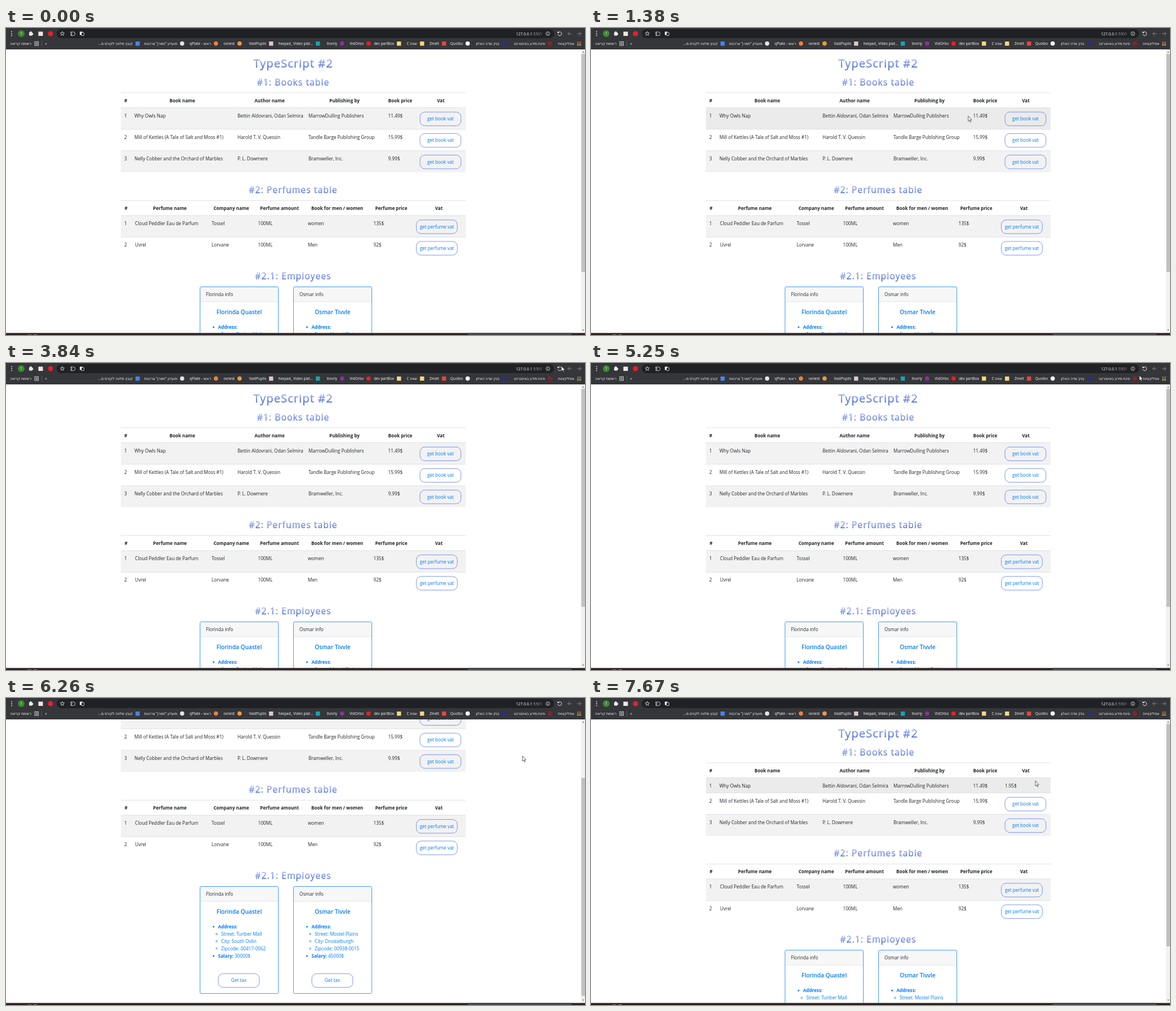
These frames come from a looping animation (1028 px wide and 545 px high, 8000 ms). An HTML page:

```html
<!DOCTYPE html>
<html lang="en">
<head>
<meta charset="utf-8">
<title>TypeScript tables</title>
<style>
  html, body { margin: 0; width: 100%; height: 100%; overflow: hidden; background: #fff; }
  svg { display: block; width: 100%; height: 100%; }
  text { font: 8.2px "Open Sans", "Noto Sans", "DejaVu Sans", sans-serif; fill: #212529; white-space: pre; }
  .mid { text-anchor: middle; }
  .end { text-anchor: end; }
  .rtl { direction: rtl; }
  .bold { font-weight: 700; font-size: 8.1px; }
  .blue { fill: #007bff; }
  .white { fill: #fff; }
  .name { font-weight: 600; font-size: 10.1px; }
  .h1, .h2 { fill: url(#heading); stroke: url(#heading); stroke-width: .3; }
  .h1 { font-size: 20.3px; letter-spacing: 1px; }
  .h2 { font-size: 15.7px; letter-spacing: 1.05px; }
  .bookmark { font-size: 6.4px; fill: #fff; }
  .url { font-size: 6.9px; fill: #fff; }
  .port { fill: #9aa0a6; }
  .line { fill: none; stroke: #e8eaed; stroke-width: 1; }
</style>
</head>
<body>
<svg viewBox="0 0 1028 545">
  <defs>
    <linearGradient id="heading" x2="0" y2="1">
      <stop offset=".2" stop-color="#aab4f5"/>
      <stop offset=".8" stop-color="#4a6de0"/>
    </linearGradient>
    <clipPath id="viewport"><rect y="38" width="1028" height="503"/></clipPath>
  </defs>
  <g id="stage"></g>
</svg>
<script>
const LOOP = 8000, CLICK = 7360;
const stage = document.getElementById('stage');

// start, ms per step, steps, end x, end y, optional control point
const moves = [
  [70, 60, 1, 1013, 517], [130, 60, 1, 1007, 396],
  [280, 80, 5, 831, 268], [830, 80, 6, 651, 159.5],
  [1380, 78, 6, 904, 117], [2100, 79, 11, 850, 236, 700, 160],
  [2960, 79, 11, 985.5, 5.5, 900, 190], [3840, 79, 10, 984, 7, 996, 4],
  [5250, 80, 4, 917, 103], [6650, 77, 5, 791, 139],
  [7040, 80, 1, 790, 156], [7590, 80, 2, 789, 147],
];

// time, scroll offset held from then on
const scrolls = [[0, 0], [5570, 20], [5650, 68], [5720, 129], [6260, 125], [6340, 75], [6420, 22], [6510, 0]];

const books = {
  top: 115, label: 'get book vat', buttonX: 735,
  heads: ['#', 'Book name', 'Author name', 'Publishing by', 'Book price', 'Vat'],
  centers: [212.5, 313, 468, 601, 700, 772],
  columns: [210, 228, 411, 537, 678.5],
  rows: [
    ['1', 'Why Owls Nap', 'Bettin Aldovrani, Odan Selmira', 'MarrowDulling Publishers', '11.49$'],
    ['2', 'Mill of Kettles (A Tale of Salt and Moss #1)', 'Harold T. V. Quessin', 'Tandle Barge Publishing Group', '15.99$'],
    ['3', 'Nelly Cobber and the Orchard of Marbles', 'P. L. Dowmere', 'Bramweller, Inc.', '9.99$'],
  ],
};
const perfumes = {
  top: 306.5, label: 'get perfume vat', buttonX: 728.5,
  heads: ['#', 'Perfume name', 'Company name', 'Perfume amount', 'Book for men / women', 'Perfume price', 'Vat'],
  centers: [213, 291, 400, 485.5, 588, 684, 768.5],
  columns: [210, 229, 365, 447.5, 536, 652.5],
  rows: [
    ['1', 'Cloud Peddler Eau de Parfum', 'Tossel', '100ML', 'women', '135$'],
    ['2', 'Uvrel', 'Lorvane', '100ML', 'Men', '92$'],
  ],
};
const employees = [
  { x: 344, name: 'Florinda Quastel', street: 'Tunber Mall', city: 'South Ovlin', zip: '00417-0062', salary: '30000$' },
  { x: 510, name: 'Osmar Tivvle', street: 'Mostel Plains', city: 'Drostelburgh', zip: '00938-0015', salary: '45000$' },
];

// label, right edge, icon colour, round icon
const bookmarks = [
  ['קובץ מלווה לקורס מ...', 225, '#4285f4'], ['מועדון "תמרן" צרכנות', 304, '#dfe5ea', 1],
  ['qPlate - ראשי', 364, '#f0803c', 1], ['ovnest', 406, '#ee9a3a', 1], ['VastPupils', 462, '#d9c9c9'],
  ['hexpad_ Video plat...', 545, '#12a5b5'], ['tivorly', 588, '#8c2f9e', 1], ['VidOrbo', 635, '#f21d1d', 1],
  ['dev partBox', 689, '#f6d978'], ['שפת C', 730, '#f6d978'], ['Zmelt', 769, '#e5473a'],
  ['Quolbo', 811, '#ffffff', 1], ['בנק שדה האלון', 876, '#2b2f7c'], ['פינת מידע באינטרנט', 957, '#8e1f2b', 1],
];

const rect = (x, y, w, h, fill, extra = '') => `<rect x="${x}" y="${y}" width="${w}" height="${h}" fill="${fill}" ${extra}/>`;
const circle = (x, y, r, fill, extra = '') => `<circle cx="${x}" cy="${y}" r="${r}" fill="${fill}" ${extra}/>`;
const path = (d, extra = 'class="line"') => `<path d="${d}" ${extra}/>`;
const text = (x, y, content, style = '') => `<text x="${x}" y="${y}" class="${style}">${content}</text>`;
const inside = (p, x, y, w, h) => p.x >= x && p.x < x + w && p.y >= y && p.y < y + h;
const range = n => [...Array(n).keys()];

function cursorAt(t) {
  let x = 1013, y = 517;
  for (const [start, step, count, endX, endY, cx = (x + endX) / 2, cy = (y + endY) / 2] of moves) {
    if (t < start) break;
    const p = Math.min(1, (Math.floor((t - start) / step) + 1) / count);
    const s = p * p * (3 - 2 * p);
    const bend = (a, c, b) => (1 - s) ** 2 * a + 2 * s * (1 - s) * c + s * s * b;
    [x, y] = [bend(x, cx, endX), bend(y, cy, endY)];
  }
  return { x, y };
}

const scrollAt = t => scrolls.filter(([start]) => start <= t).pop()[1];

function button(x, y, label, mouse) {
  const hover = inside(mouse, x, y, 73, 24.3);
  return rect(x, y, 72.8, 24.3, hover ? '#007bff' : 'none', 'rx="8.5" stroke="#5f7cf0" stroke-width=".8"')
    + text(x + 36.5, y + 15, label, hover ? 'mid white' : 'mid blue');
}

function table({ top, label, buttonX, heads, centers, columns, rows }, mouse, firstVat) {
  let y = top + 26.5;
  let out = rect(204, top - .5, 612, 1, '#dee2e6')
    + heads.map((head, i) => text(centers[i], top + 16.6, head, 'mid bold')).join('');
  rows.forEach((cells, i) => {
    const solved = firstVat && i === 0;
    const height = solved ? 27 : 38.2;
    if (i % 2 === 0) out += rect(204, y, 612, height, '#f2f2f2');
    if (inside(mouse, 204, y, 612, height)) out += rect(204, y, 612, height, '#ebebeb');
    out += rect(204, y - .5, 612, 1, '#dee2e6');
    out += cells.map((cell, c) => text(columns[c], y + 17.2, cell)).join('');
    out += solved ? text(buttonX, y + 17.2, firstVat) : button(buttonX, y + 7.7, label, mouse);
    y += height;
  });
  return out;
}

function card({ x, name, street, city, zip, salary }, mouse) {
  const details = [`Street: ${street}`, `City: ${city}`, `Zipcode: ${zip}`];
  return rect(x + .5, 459.5, 139, 26.5, '#f7f7f7', 'rx="2"') + rect(x, 485.5, 139, .8, '#dfdfdf')
    + rect(x + .5, 459.5, 139, 190, 'none', 'rx="2" stroke="#2b90ff" stroke-width=".9"')
    + text(x + 11, 475.8, `${name.split(' ')[0]} info`)
    + text(x + 70, 507.5, name, 'mid name blue')
    + circle(x + 24.5, 531, 1.5, '#007bff') + text(x + 32.5, 534, 'Address:', 'bold blue')
    + details.map((line, i) => circle(x + 30, 544 + i * 12.9, 1.4, 'none', 'stroke="#007bff" stroke-width=".7"')
      + text(x + 38, 547 + i * 12.9, line, 'blue')).join('')
    + circle(x + 24.5, 583, 1.5, '#007bff')
    + text(x + 32.5, 586, `<tspan class="bold">Salary:</tspan> ${salary}`, 'blue')
    + button(x + 33, 614.4, 'Get tax', mouse);
}

function page(t, cursor) {
  const scroll = scrollAt(t), clicked = t >= CLICK, shift = clicked ? -11.8 : 0;
  const mouse = t < 70 || cursor.y < 38 ? { x: -1, y: -1 } : { x: cursor.x, y: cursor.y + scroll };
  const lower = { x: mouse.x, y: mouse.y - shift };
  return `<g clip-path="url(#viewport)"><g transform="translate(0 ${-scroll})">`
    + text(510, 70.2, 'TypeScript #2', 'mid h1')
    + text(510, 102.4, '#1: Books table', 'mid h2')
    + table(books, mouse, clicked && '1.95$')
    + `<g transform="translate(0 ${shift})">`
    + text(510, 293, '#2: Perfumes table', 'mid h2')
    + table(perfumes, lower)
    + text(510, 446.2, '#2.1: Employees', 'mid h2')
    + employees.map(person => card(person, lower)).join('')
    + '</g></g></g>'
    + rect(1021, 38, 7, 503, '#f1f1f1')
    + rect(1021.5, 46 + scroll * .767, 6.5, clicked ? 395 : 387, '#c1c1c1')
    + path('M1023 43.5l1.8-2 1.8 2zM1023 535.5l1.8 2 1.8-2z', 'fill="#606060"');
}

function toolbar(loading) {
  const dots = [6.5, 10, 13.5].map(y => circle(10, y, .9, '#e8eaed')).join('');
  const puzzle = rect(41, 7.5, 6, 6, '#e8eaed', 'rx=".8"') + circle(44, 7.2, 1.5, '#e8eaed') + circle(47, 10.5, 1.5, '#e8eaed');
  const star = range(10).map(i => {
    const r = i % 2 ? 1.7 : 3.9, a = i * Math.PI / 5;
    return `${100 + r * Math.sin(a)} ${10 - r * Math.cos(a)}`;
  }).join('L');
  const reload = loading
    ? path('M980 7l6 6m0-6l-6 6')
    : path('M980.3 8.2A3.4 3.4 0 1 1 979.8 11') + path('M979.2 5.7v3.4h3.4z', 'fill="#e8eaed"');
  const translate = rect(131, 6.5, 5, 6, '#e8eaed', 'rx=".7"')
    + rect(134, 8, 4.5, 5.5, '#202124', 'rx=".7" stroke="#e8eaed" stroke-width=".8"');
  return rect(0, 0, 1028, 38, '#35363a') + rect(90, 2, 883, 16, '#202124', 'rx="8"')
    + dots + circle(27, 10, 6, '#3b8a2e') + text(27, 12.3, '1', 'mid url')
    + puzzle + rect(57.5, 6.5, 8, 7.5, '#f0e8e8') + circle(79, 10, 4.6, '#e4202c')
    + path(`M${star}Z`, 'class="line" style="stroke-width:.8"')
    + path('M115 7h4.5a1.5 1.5 0 0 1 0 6.5h-4zM115 7l2.5 3-2.5 3.5', 'class="line" style="stroke-width:.8"')
    + (loading ? '' : translate)
    + text(952, 12.5, '127.0.0.1<tspan class="port">:5501</tspan>', 'end url')
    + circle(962, 10, 3.3, 'none', 'stroke="#e8eaed" stroke-width=".8"') + path('M962 9.6v2.2M962 8v.8')
    + reload
    + path('M1004.5 10h-7m3.2-3.3l-3.3 3.3 3.3 3.3M1014 10h7m-3.2-3.3l3.3 3.3-3.3 3.3', 'class="line" style="stroke:#85878a"');
}

function bookmarkBar() {
  const entry = (label, right) => text(right, 30, label, `bookmark ${/^[א-ת]/.test(label) ? 'rtl' : 'end'}`);
  const colours = ['#e05545', '#4caf67', '#e8b83c'];
  return bookmarks.map(([label, right, colour, round]) => entry(label, right)
    + (round ? circle(right + 8.7, 27.6, 3.8, colour) : rect(right + 5, 24, 7.4, 7.4, colour))).join('')
    + entry('רשימת קריאה', 45) + rect(51, 24.2, 6.6, 6.8, 'none', 'stroke="#e8eaed" stroke-width=".8"')
    + path('M52.5 26.2h3.8M52.5 27.7h3.8M52.5 29.2h3.8', 'class="line" style="stroke-width:.7"')
    + rect(63, 23, .7, 9, '#66686c') + text(69.5, 30, '«', 'bookmark')
    + entry('אפליקציות', 1009)
    + range(9).map(i => rect(1014 + i % 3 * 2.6, 24.2 + Math.floor(i / 3) * 2.6, 1.8, 1.8, colours[Math.floor(i / 3)])).join('');
}

const taskbar = rect(0, 541.4, 1028, 3.6, '#2c2221') + rect(820, 541.4, 184, 3.6, '#47464a')
  + text(38, 548.5, '00:47', 'bookmark');

const pointer = ({ x, y }) => path('M0 0V9.2L2.1 7.3 3.6 10.6 5 10 3.5 6.8H6.3Z',
  `transform="translate(${x} ${y})" fill="#fff" stroke="#222" stroke-width=".7"`);

function scene(t) {
  const cursor = cursorAt(t);
  const loading = t >= 3920 && t < 4710;
  return page(t, cursor) + toolbar(loading) + bookmarkBar() + taskbar + (t < 70 ? '' : pointer(cursor));
}

let shown = '';
function draw() {
  const markup = scene(performance.now() % LOOP);
  if (markup !== shown) stage.innerHTML = shown = markup;
  requestAnimationFrame(draw);
}
draw();
</script>
</body>
</html>
```
